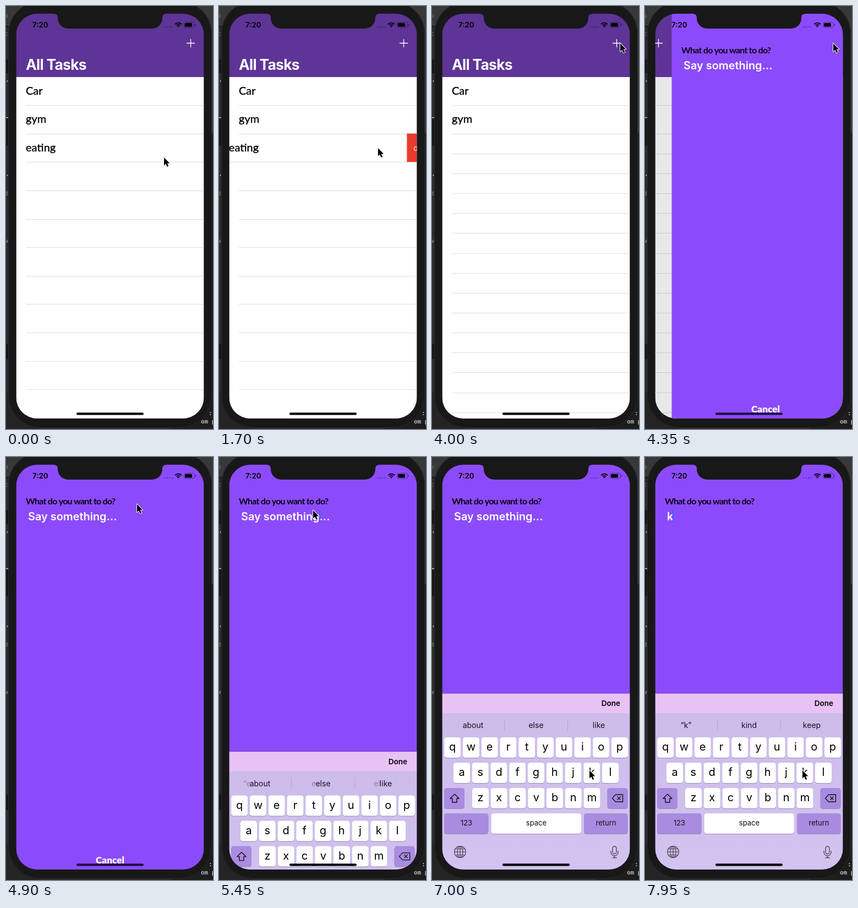
An HTML page with a canvas that plays this animation: 376 px wide and 768 px high, repeating every 8000 ms.

```html
<!DOCTYPE html>
<html lang="en">
<head>
<meta charset="utf-8">
<title>Task list</title>
<style>
  html, body { margin: 0; width: 100%; height: 100%; overflow: hidden; background: #262626; }
  canvas { display: block; width: 376px; height: 768px; }
</style>
</head>
<body>
<canvas id="stage"></canvas>
<script>
const W = 376, H = 768, LOOP = 8000;
const SCREEN = { x: 18.5, y: 14, w: 341, h: 735 };
const RIGHT = SCREEN.x + SCREEN.w;
const VIOLET = '#8c4bfb', HEADER = '#5e3496';
const UI = 'Inter, sans-serif', BODY = 'Lato, sans-serif', CODE = '"DejaVu Sans Mono", monospace';

// Moments of the story, in ms
const DRAG = 1580, RELEASE = 2390, COLLAPSE = 2500, PUSH = 4126, FOCUS = 5323, TYPE = 7500;

// Pointer stops: time, x, y
const STOPS = [
  [0, 287, 275], [300, 287, 275], [900, 307, 257], [DRAG, 307, 257], [2350, 33, 272],
  [3300, 33, 272], [4000, 342, 68], [4500, 342, 68], [5200, 171, 97], [5500, 171, 97],
  [5930, 174, 642], [6150, 174, 642], [6900, 286, 569], [LOOP, 286, 569]
];

const canvas = document.getElementById('stage');
const ctx = canvas.getContext('2d');
const dpr = window.devicePixelRatio || 1;
canvas.width = W * dpr;
canvas.height = H * dpr;

const clamp = v => Math.max(0, Math.min(1, v));
const smooth = u => u * u * (3 - 2 * u);

// Critically damped spring from 0 to 1
function spring(ms) {
  const x = Math.max(0, ms) * 0.018;
  return 1 - (1 + x) * Math.exp(-x);
}

function pointerAt(t) {
  let i = 0;
  while (i < STOPS.length - 2 && t >= STOPS[i + 1][0]) i++;
  const [t0, x0, y0] = STOPS[i], [t1, x1, y1] = STOPS[i + 1];
  const u = smooth(clamp((t - t0) / (t1 - t0)));
  return [x0 + (x1 - x0) * u, y0 + (y1 - y0) * u];
}

function rect(x, y, w, h, color) {
  ctx.fillStyle = color;
  ctx.fillRect(x, y, w, h);
}

function round(x, y, w, h, r, color) {
  ctx.beginPath();
  ctx.roundRect(x, y, w, h, r);
  ctx.fillStyle = color;
  ctx.fill();
}

function text(str, x, y, font, color, align = 'left', spacing = 0) {
  ctx.font = font;
  ctx.textAlign = align;
  ctx.letterSpacing = spacing + 'px';
  ctx.fillStyle = color;
  ctx.fillText(str, x, y);
}

function stroke(color, width, build) {
  ctx.beginPath();
  build();
  ctx.strokeStyle = color;
  ctx.lineWidth = width;
  ctx.stroke();
}

function line(...pts) {
  pts.forEach(([x, y], i) => i ? ctx.lineTo(x, y) : ctx.moveTo(x, y));
}

function clipped(x, y, w, h, r, draw) {
  ctx.save();
  ctx.beginPath();
  ctx.roundRect(x, y, w, h, r);
  ctx.clip();
  draw();
  ctx.restore();
}

function drawDesk() {
  rect(0, 0, W, H, '#292a2b');
  rect(0, 0, W, 36, '#383838');
  for (const [y, h] of [[36, 2], [97, 25], [203, 50], [613, 28]]) rect(0, y, 5, h, '#151515');
  rect(0, 202, 4, 1.5, '#c8c8c8');
  rect(372, 36, 4, 194, '#3a3a3a');
  rect(372, 230, 4, 538, '#1b1b1b');
  rect(300, 700, 76, 68, '#1d1d1d');
  rect(0, 700, 60, 68, '#242424');
  const font = '11px ' + CODE;
  text('u', -3, 21, font, '#777');
  text('c', -3, 54, font, '#777');
  text('’', -1, 143, font, '#ccc');
  text('’', -1, 314, font, '#ccc');
  text('d', -3, 344, font, '#5f9a5a');
  text('w', -3, 430, font, '#999');
  const bold = 'bold 11px ' + CODE;
  round(4, -8, 370, 774, 58, '#181818');
  stroke('#2b2b2b', 1, () => ctx.roundRect(4.5, -8, 369, 773.5, 58));
  text('om p', 354, 758, bold, '#b5b5b5');
  text(':', 368, 743, bold, '#b5b5b5');
}

function taskName(str, x, y) {
  text(str, x, y, '20px ' + BODY, '#000');
  ctx.strokeStyle = '#000';
  ctx.lineWidth = 0.35;
  ctx.strokeText(str, x, y);
}

function separator(x, y) {
  rect(x, Math.round(y), RIGHT - x, 1, '#dedede');
}

function drawTable(t, shift) {
  const rowH = 51.65, top = 128.8, third = top + 2 * rowH;
  const left = 36 + shift;
  rect(SCREEN.x, 128, SCREEN.w, 621, '#fff');
  taskName('Car', left, 161);
  taskName('gym', left, 212);
  separator(left, top + rowH - 0.5);
  separator(left, third - 0.5);

  const collapsing = t >= COLLAPSE;
  const height = rowH * (1 - (collapsing ? spring(t - COLLAPSE) : 0));
  const step = collapsing ? 36.15 : rowH;
  for (let y = third + height + step; y < 749; y += step) separator(left, y - 0.5);

  // Swiped row with its red action
  let offset = t < DRAG ? 0 : Math.max(0, 307 - pointerAt(Math.min(t, RELEASE))[0]);
  if (t > RELEASE) offset += (SCREEN.w - offset) * smooth(clamp((t - RELEASE) / (COLLAPSE - RELEASE)));
  if (!collapsing) {
    taskName('eating', 36 - offset, 264);
    const x = Math.max(SCREEN.x, 36 - offset);
    rect(x, 283, RIGHT - offset - x, 1, '#dedede');
  }
  if (offset > 0 && height > 0.4) {
    clipped(RIGHT - offset, third - 0.5, offset, height, 0, () => {
      rect(SCREEN.x, 200, SCREEN.w, 100, '#ea3a2b');
      text('delete', RIGHT - offset + 12, 262.5, '13px ' + UI, '#fff');
    });
  }
}

function drawList(t, p) {
  drawTable(t, -0.3 * p * SCREEN.w);
  if (p > 0) rect(SCREEN.x, 128, SCREEN.w, 621, `rgba(0,0,0,${0.1 * p})`);
  rect(SCREEN.x, 14, SCREEN.w, 115, HEADER);
  const dx = -p * SCREEN.w;
  text('All Tasks', 36 + dx, 116, `bold 26.5px ${UI}`, '#fff', 'left', -0.75);
  stroke('#fff', 1.3, () => {
    line([328 + dx, 67.5], [343 + dx, 67.5]);
    line([335.5 + dx, 60], [335.5 + dx, 75]);
  });
}

function drawEditor(t, p) {
  const dx = (1 - p) * SCREEN.w;
  rect(SCREEN.x + dx, 14, SCREEN.w, 735, VIOLET);
  text('What do you want to do?', 36 + dx, 86, `bold 16px ${BODY}`, '#0a0318', 'left', -0.75);
  const typed = t >= TYPE;
  text(typed ? 'k' : 'Say something...', 40 + dx, 115, `600 19.9px ${UI}`, '#fff');
  text('Cancel', 189 + dx, 738, `900 17.3px ${BODY}`, '#fff', 'center');
  const since = t - (typed ? TYPE : FOCUS);
  if (since >= 0 && since % 1000 < 500) rect(typed ? 50 : 182.5, 97, 1.8, 22, '#3f5cf5');
}

function key(x, y, w, color = '#fff') {
  round(x, y + 1, w, 37, 4.5, '#9787bd');
  round(x, y, w, 37, 4.5, color);
}

function keyRow(letters, first, y) {
  [...letters].forEach((c, i) => {
    const cx = first + i * 33.75;
    key(cx - 15, y, 30);
    text(c, cx, y + 24, '20px ' + UI, '#000', 'center');
  });
}

function drawShiftIcon() {
  ctx.lineJoin = 'round';
  stroke('#111', 1.4, () => {
    line([41, 612], [49, 620], [45, 620], [45, 627], [37, 627], [37, 620], [33, 620]);
    ctx.closePath();
  });
}

function drawDeleteIcon() {
  stroke('#111', 1.3, () => {
    line([327.5, 619.5], [333.5, 613], [346.5, 613], [346.5, 626], [333.5, 626]);
    ctx.closePath();
    line([336.5, 616.5], [342.5, 622.5]);
    line([342.5, 616.5], [336.5, 622.5]);
  });
}

function drawGlobe() {
  stroke('#4a4556', 1.2, () => {
    ctx.arc(51, 717, 10.3, 0, 7);
    ctx.moveTo(56, 717);
    ctx.ellipse(51, 717, 5, 10.3, 0, 0, 7);
    line([51, 706.7], [51, 727.3]);
    line([40.7, 717], [61.3, 717]);
    line([42.5, 711.5], [59.5, 711.5]);
    line([42.5, 722.5], [59.5, 722.5]);
  });
}

function drawMic() {
  stroke('#4a4556', 1.3, () => {
    ctx.roundRect(328, 707, 7, 13.5, 3.5);
    ctx.moveTo(325, 715);
    ctx.lineTo(325, 717.5);
    ctx.arc(331.5, 717.5, 6.5, Math.PI, 0, true);
    ctx.lineTo(338, 715);
    line([331.5, 724], [331.5, 727.5]);
    line([327.5, 727.5], [335.5, 727.5]);
  });
}

function drawSuggestions(t) {
  const words = t < TYPE ? ['about', 'else', 'like'] : ['“k”', 'kind', 'keep'];
  const centers = [74.5, 189, 303];
  const ghost = 0.35 * clamp((5600 - t) / 150);
  if (ghost > 0) {
    ['“e', 'e', 'el'].forEach((s, i) => {
      text(s, [44, 168, 281][i], 492, '14px ' + UI, `rgba(40,20,60,${ghost})`);
    });
  }
  words.forEach((s, i) => text(s, centers[i], 492, '14px ' + UI, '#16121e', 'center'));
  rect(131, 477, 1, 20, '#b5a5d5');
  rect(246, 477, 1, 20, '#b5a5d5');
}

function drawKeyboard(t) {
  if (t < FOCUS) return;
  ctx.save();
  ctx.translate(0, 320 * (1 - spring(t - FOCUS)));
  rect(SCREEN.x, 429, SCREEN.w, 37, '#e8c2f5');
  rect(SCREEN.x, 428.5, SCREEN.w, 1, '#7445c4');
  text('Done', 342, 452, `600 13.5px ${UI}`, '#000', 'right');
  const shade = ctx.createLinearGradient(0, 465, 0, 749);
  shade.addColorStop(0, '#cdbcea');
  shade.addColorStop(1, '#d2c3f0');
  rect(SCREEN.x, 465, SCREEN.w, 284, shade);
  drawSuggestions(t);
  keyRow('qwertyuiop', 37.2, 509);
  keyRow('asdfghjkl', 54, 555);
  keyRow('zxcvbnm', 88, 601);
  const dark = '#a98be0';
  key(22, 601, 37, dark);
  key(318.5, 601, 37, dark);
  key(22, 647, 80.5, dark);
  key(107.5, 647, 163.5);
  key(276, 647, 79.5, dark);
  const small = '13px ' + UI;
  text('123', 62.5, 669, small, '#111', 'center');
  text('space', 189.5, 668.5, small, '#111', 'center');
  text('return', 316, 668.5, small, '#111', 'center');
  drawShiftIcon();
  drawDeleteIcon();
  drawGlobe();
  drawMic();
  ctx.restore();
}

function drawStatus() {
  text('7:20', 48, 39, `600 13.3px ${UI}`, '#000');
  for (let i = 0; i < 4; i++) {
    ctx.beginPath();
    ctx.arc(288.5 + i * 4.2, 38, 1.2, 0, 7);
    ctx.fillStyle = 'rgba(0,0,0,.33)';
    ctx.fill();
  }
  const a = -Math.PI * 0.76, b = -Math.PI * 0.24;
  for (const r of [4.6, 8]) stroke('#000', 1.9, () => ctx.arc(313, 38.6, r, a, b));
  ctx.beginPath();
  ctx.moveTo(313, 39);
  ctx.arc(313, 38.6, 2.4, a, b);
  ctx.fillStyle = '#000';
  ctx.fill();
  stroke('rgba(0,0,0,.4)', 1, () => ctx.roundRect(323.5, 29.5, 19, 9.5, 2.8));
  round(325, 31, 13, 6.5, 1.5, '#000');
  round(343.6, 32.5, 1.4, 3.6, 0.7, 'rgba(0,0,0,.45)');
}

function drawNotch() {
  ctx.beginPath();
  ctx.moveTo(86, 13);
  ctx.lineTo(86, 14);
  ctx.quadraticCurveTo(94, 14, 94, 21);
  ctx.arcTo(94, 41, 114, 41, 19);
  ctx.arcTo(284, 41, 284, 21, 19);
  ctx.lineTo(284, 21);
  ctx.quadraticCurveTo(284, 14, 292, 14);
  ctx.lineTo(292, 13);
  ctx.fillStyle = '#181818';
  ctx.fill();
}

function drawPointer(x, y) {
  ctx.save();
  ctx.translate(x, y);
  ctx.beginPath();
  line([0, 0], [0, 14.5], [3.3, 11.5], [5.8, 17], [8.2, 16], [5.8, 10.6], [10.3, 10.4]);
  ctx.closePath();
  ctx.lineJoin = 'round';
  ctx.strokeStyle = '#fff';
  ctx.lineWidth = 1.8;
  ctx.stroke();
  ctx.fillStyle = '#000';
  ctx.fill();
  ctx.restore();
}

function render(t) {
  ctx.setTransform(dpr, 0, 0, dpr, 0, 0);
  drawDesk();
  const p = spring(t - PUSH);
  clipped(SCREEN.x, SCREEN.y, SCREEN.w, SCREEN.h, 38, () => {
    if (p < 0.999) drawList(t, p);
    if (p > 0) drawEditor(t, p);
    drawStatus();
    drawKeyboard(t);
    const overViolet = p > 0.5 && t < FOCUS;
    round(128, 738.3, 122, 4.2, 2.1, overViolet ? 'rgba(12,4,30,.85)' : '#000');
  });
  drawNotch();
  drawPointer(...pointerAt(t));
}

const start = performance.now();
function tick() {
  render((performance.now() - start) % LOOP);
  requestAnimationFrame(tick);
}
tick();
</script>
</body>
</html>
```
